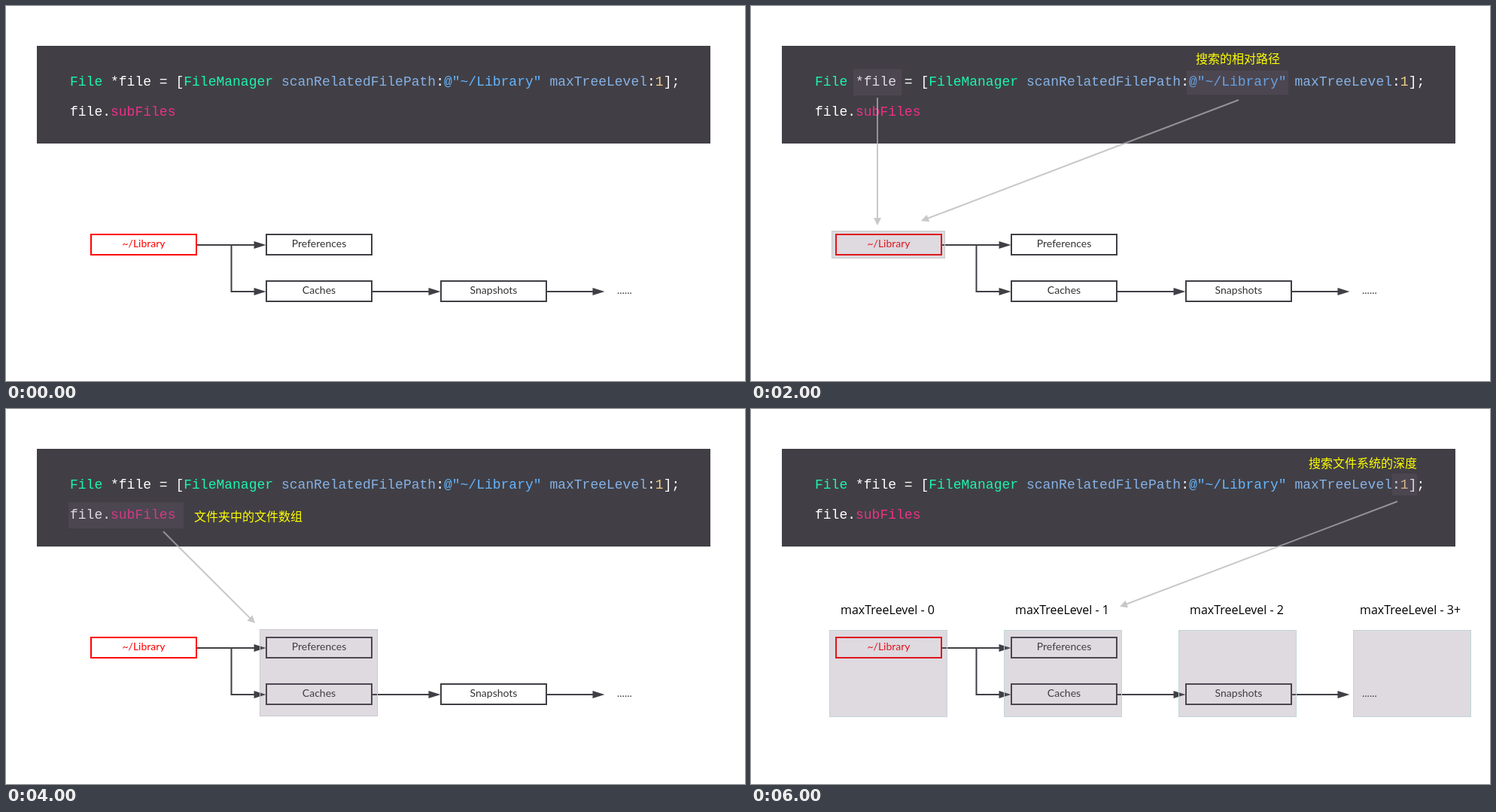
An HTML page for the animation above (8000 ms loop, 982x499 px).

```html
<!DOCTYPE html>
<html lang="zh-CN">
<head>
<meta charset="utf-8">
<title>File tree scan</title>
<style>
html, body { margin: 0; width: 100%; height: 100%; overflow: hidden; background: #fff; }
svg { display: block; }
.code { font: 18px "Liberation Mono", "Courier New", monospace; fill: #fff; }
.type { fill: #1cf5ad; }
.call { fill: #86b1e6; }
.str { fill: #64b5ff; }
.num { fill: #f2cd8c; }
.prop { fill: #f02f88; }
.node rect { fill: none; stroke: #413f45; stroke-width: 2; }
.node text, .dots { font: 14px Lato, sans-serif; fill: #333; }
.node text { text-anchor: middle; }
.root rect { stroke: #f00; }
.root text { fill: #f00; }
.link { fill: none; stroke: #413f45; stroke-width: 2; }
.head { fill: #413f45; }
.shade { fill: rgb(113, 95, 121); fill-opacity: .23; }
.edge { stroke: #c9c9cd; }
.level { stroke: #c2d6d8; }
.note { font: 16px "Noto Sans CJK SC", "Noto Sans CJK", sans-serif; fill: #ff0; }
.label { font: 16px "Open Sans", "Noto Sans", sans-serif; fill: #000; }
.pointer { opacity: .72; stroke: #b3b3b7; fill: #b3b3b7; }
.pointer line { stroke-width: 2; }
.pointer path { stroke: none; }
</style>
</head>
<body>
<svg id="stage" width="982" height="499" viewBox="0 0 982 499">
  <rect x="41" y="53" width="895" height="130" fill="#413f45"/>
  <text class="code" x="85" y="106"><tspan class="type">File</tspan> *file = [<tspan class="type">FileManager</tspan> <tspan class="call">scanRelatedFilePath</tspan>:<tspan class="str">@"~/Library"</tspan> <tspan class="call">maxTreeLevel</tspan>:<tspan class="num">1</tspan>];</text>
  <text class="code" x="85" y="146">file.<tspan class="prop">subFiles</tspan></text>
  <path class="link" d="M254 318H332M299.5 318V380H332M487 380H564M719 380H782"/>
  <g id="tree"></g>
  <text class="dots" x="812" y="383">......</text>
  <g id="overlay"></g>
</svg>
<script>
const node = (x, y, name, cls = "") =>
  `<g class="node ${cls}"><rect x="${x}" y="${y}" width="140" height="27"/>
   <text x="${x + 70}" y="${y + 17}">${name}</text></g>`;
const head = (x, y) => `<path class="head" d="M${x} ${y}l-16 -5v10z"/>`;
const shade = (x, y, w, h, cls = "") => {
  const inset = cls ? 0.5 : 0;
  return `<rect class="shade ${cls}" x="${x + inset}" y="${y + inset}" width="${w - 2 * inset}" height="${h - 2 * inset}"/>`;
};
const text = (cls, x, y, words) => `<text class="${cls}" x="${x}" y="${y}">${words}</text>`;

// Straight line with a triangular tip at (x2, y2)
function pointer(x1, y1, x2, y2) {
  const length = Math.hypot(x2 - x1, y2 - y1);
  const angle = Math.atan2(y2 - y1, x2 - x1) * 180 / Math.PI;
  return `<g class="pointer" transform="translate(${x1} ${y1}) rotate(${angle})">
    <line x2="${length - 9}"/><path d="M${length} 0l-10 -5v10z"/></g>`;
}

const levels = [[104, 119, "0"], [336, 351, "1"], [568, 583, "2"], [800, 809, "3+"]];

const scenes = [
  "",
  shade(136, 84, 64, 35) + shade(579, 86, 135, 32) + shade(107, 299, 151, 37, "edge") +
    text("note", 591, 75.5, "搜索的相对路径") +
    pointer(168, 122, 168, 292) + pointer(648, 125, 226, 286),
  shade(83, 124, 153, 35) + shade(337, 293, 157, 116, "edge") +
    text("note", 250, 148.5, "文件夹中的文件数组") +
    pointer(209, 163, 331, 285),
  shade(852, 86, 33, 29) +
    text("note", 741, 77.5, "搜索文件系统的深度") +
    levels.map(([x, tx, n]) => shade(x, 294, 157, 116, "level") +
      text("label", tx, 273, "maxTreeLevel - " + n)).join("") +
    pointer(859, 123, 490, 263)
];

document.getElementById("tree").innerHTML =
  node(113, 304, "~/Library", "root") + node(346, 304, "Preferences") +
  node(346, 366, "Caches") + node(578, 366, "Snapshots") +
  head(345.5, 318) + head(345.5, 380) + head(577.5, 380) + head(795.5, 380);

const overlay = document.getElementById("overlay");
const start = performance.now();
let shown = -1;

function draw() {
  const scene = Math.floor((performance.now() - start) / 2000) % scenes.length;
  if (scene !== shown) overlay.innerHTML = scenes[shown = scene];
  requestAnimationFrame(draw);
}
draw();
</script>
</body>
</html>
```
